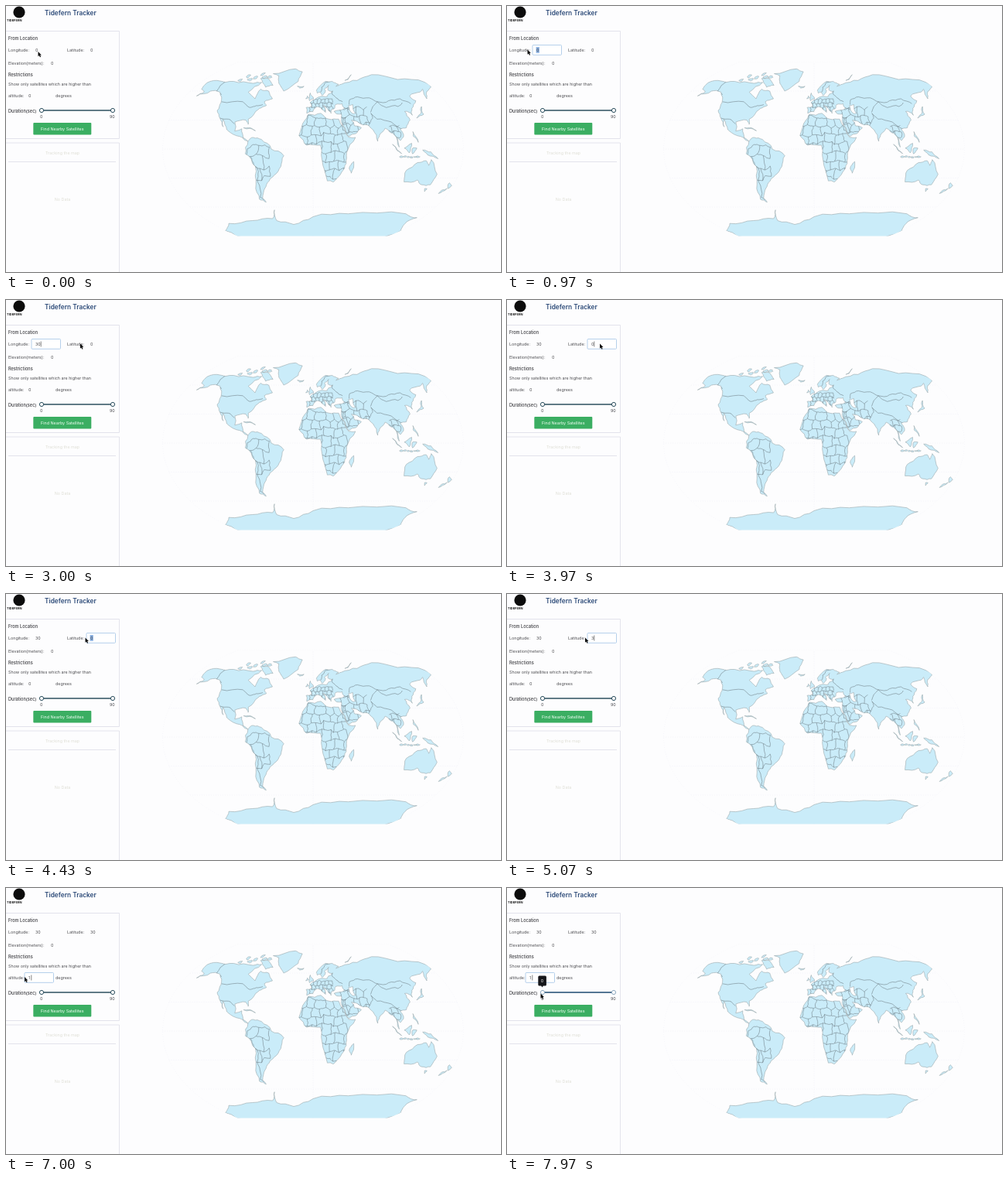
An HTML page for the animation above (8 s loop, 640 px wide and 344 px high).

```html
<!DOCTYPE html>
<html lang="en">
<head>
<meta charset="utf-8">
<title>Satellite tracker</title>
<style>
  html, body { margin: 0; width: 100%; height: 100%; overflow: hidden; background: #fdfdfe; }
  svg { display: block; width: 100vw; height: 100vh; }
  text { font: 5.4px Inter, "Open Sans", sans-serif; fill: #4e4e52; }
  .strong { font-weight: 500; font-size: 5.6px; fill: #38383c; }
  .title { font-weight: 600; font-size: 8.3px; fill: #2c4a78; }
  .pale { fill: #dfdfd6; }
  .rule { fill: none; stroke: #dedee8; stroke-width: .8; }
  .grid { fill: none; stroke: #ededf5; stroke-width: .6; stroke-dasharray: 1 2; }
  .land { fill: #caecf9; stroke: #9aa8ac; stroke-width: .6; stroke-linejoin: round; }
  .border { fill: none; stroke: #6c7c82; stroke-width: .55; stroke-linejoin: round; }
  .field { fill: #fff; stroke: #a3c4e6; stroke-width: .8; }
</style>
</head>
<body>
<svg viewBox="0 0 640 344" preserveAspectRatio="none">
  <defs>
    <clipPath id="globe"><path/></clipPath>
    <clipPath id="mainland"><path/></clipPath>
  </defs>
  <g id="map" clip-path="url(#globe)"></g>

  <circle cx="17" cy="8" r="7.6" fill="#0c0c0c"/>
  <text x="1" y="20" style="font-size:4px;font-weight:700;fill:#222">TIDEFERN</text>
  <text class="title" x="50" y="11.8">Tidefern Tracker</text>

  <path class="rule" d="M0 32.5H146.5V171.5H0M0 177H146.5V344M3 201.5H142"/>
  <text class="strong" x="3" y="43.6">From Location</text>
  <text x="3" y="59">Longitude:</text>
  <text x="79" y="59">Latitude:</text>
  <text x="3" y="76">Elevation(meters):</text>
  <text x="58" y="76">0</text>
  <text class="strong" x="3" y="90.6">Restrictions</text>
  <text x="3" y="103.4">Show only satellites which are higher than</text>
  <text x="3" y="118">altitude:</text>
  <text x="64" y="118">degrees</text>
  <text class="strong" x="3" y="138">Duration(sec)</text>

  <path id="rail" d="M46 135H138" stroke-width="1.6"/>
  <g id="handles" fill="#fff"><circle cx="46" cy="135" r="2.6"/><circle cx="138" cy="135" r="2.6"/></g>
  <text x="44" y="145">0</text>
  <text x="134" y="145">90</text>

  <rect x="35.3" y="151" width="75" height="15.4" rx="1" fill="#3bae62"/>
  <text x="72.8" y="161" text-anchor="middle" style="fill:#f4fff6">Find Nearby Satellites</text>
  <text class="pale" x="73" y="192" text-anchor="middle">Tracking the map</text>
  <text class="pale" x="73" y="252" text-anchor="middle">No Data</text>

  <g id="fields"></g>
  <g id="tooltip">
    <rect x="40.3" y="113.5" width="10.6" height="13" rx="1.5" fill="#16161a"/>
    <path d="M44 126h3l-1.5 2.4z" fill="#16161a"/>
    <text x="45.5" y="122" text-anchor="middle" style="fill:#f5f5f5">0</text>
  </g>
  <path id="cursor" d="M0 0V6.2L1.4 5 2.5 7.2 3.6 6.7 2.6 4.6 4.4 4.4Z" fill="#0a0a0a"/>
</svg>
<script>
const byId = id => document.getElementById(id);
function add(parent, tag, attrs) {
  const el = document.createElementNS('http://www.w3.org/2000/svg', tag);
  for (const name in attrs) el.setAttribute(name, attrs[name]);
  return parent.appendChild(el);
}
let seed = 7;
const random = () => (seed = (seed * 16807) % 2147483647) / 2147483647;
const jitter = amount => (random() * 2 - 1) * amount;

// Kavrayskiy VII projection of a longitude and latitude in degrees
const RAD = Math.PI / 180, SCALE = 71.6;
function project([lon, lat]) {
  const phi = lat * RAD;
  return [397 + SCALE * 1.5 * lon / 180 * Math.sqrt(Math.PI ** 2 / 3 - phi * phi), 185 - SCALE * phi];
}
const parse = text => text.split(',').map(pair => pair.trim().split(' ').map(Number));
const trace = points => 'M' + points.map(p => p.map(v => v.toFixed(1)).join(' ')).join('L');

// Midpoint displacement turns a few key points into a ragged line
function roughen(points, depth = 2) {
  if (!depth) return points;
  const out = [points[0]];
  for (let i = 1; i < points.length; i++) {
    const [x0, y0] = points[i - 1], [x1, y1] = points[i];
    const length = Math.hypot(x1 - x0, y1 - y0) || 1, shift = jitter(Math.min(length, 16) * .13) / length;
    out.push([(x0 + x1) / 2 - (y1 - y0) * shift, (y0 + y1) / 2 + (x1 - x0) * shift], points[i]);
  }
  return roughen(out, depth - 1);
}
const line = points => trace(roughen(points.map(project)));
const coast = points => line([...points, points[0]]) + 'Z';
const map = byId('map');

const range = (from, to, step) => Array.from({ length: Math.floor((to - from) / step) + 1 }, (_, i) => from + i * step);
const meridian = lon => range(-90, 90, 5).map(lat => project([lon, lat]));
byId('globe').firstChild.setAttribute('d', trace([...meridian(-180), ...meridian(180).reverse()]));
add(map, 'path', { class: 'grid', d: [-179.8, 0, 179.8].map(lon => trace(meridian(lon))).join('')
  + range(-60, 90, 30).map(lat => trace([project([-180, lat]), project([180, lat])])).join('') });

const continents = {
  northAmerica: `-168 66, -157 71, -128 70, -95 68, -82 69, -94 59, -80 52, -78 62, -65 60, -56 52, -66 49, -62 45,
    -70 42, -76 35, -81 31, -80 25.5, -84 30, -97 28, -95 18.5, -87 21, -84 11, -78 8, -88 13, -105 20, -113 31,
    -110 23, -117 32, -124 40, -124 48, -135 59, -150 60, -164 55, -158 59, -166 62`,
  southAmerica: `-78 8, -72 12, -62 10, -50 0, -35 -7, -39 -18, -48 -27, -58 -35, -62 -40, -69 -51, -66 -55,
    -74 -52, -73 -37, -70 -18, -81 -5`,
  africa: `-6 36, 10 37, 20 31, 32 31, 43 12, 51 12, 40 -4, 40 -15, 35 -24, 26 -34, 18 -33, 12 -17, 9 4, -8 4,
    -17 14, -10 30`,
  eurasia: `31 70, 20 70, 5 61, 6 58, 11 59, 13 55.5, 18 60, 17 62, 24 66, 22 61, 29 60, 22 57, 20 54.5, 9 54, 2 51,
    -4 48, -1.5 44, -9 43, -8 37, 0 39, 4 43.5, 10 43, 16 38, 13 45.5, 20 40, 23 37, 24 41, 28 42, 30 46, 39 47,
    41 42, 27 39, 30 36.5, 36 36.5, 35 29, 43 13, 52 16, 59 22, 51 24, 48 30, 57 27, 67 25, 73 20, 77.5 8, 80 14,
    88 21.5, 94 17, 98 15, 103 2, 100 13, 105 9, 109 13, 106 20, 114 22, 121 30, 118 39, 126 35, 129 42, 140 50,
    136 55, 155 59, 163 62, 157 52, 163 58, 179 64, 179 69, 140 72, 104 77, 72 71, 44 67, 35 65, 40 67`,
  australia: `114 -22, 126 -14, 136 -12, 140 -17, 142 -11, 153 -26, 150 -37, 139 -37, 131 -32, 115 -34`,
  antarctica: `-180 -94, -180 -84.5, -150 -77, -103 -74, -67 -72, -58 -63, -62 -74, -35 -78, 0 -70, 55 -67, 145 -67,
    170 -71, 165 -78, 180 -84.5, 180 -94`,
  greenland: `-72 78, -35 83, -20 80, -24 70, -43 60, -54 68, -60 76`
};
const mainland = Object.values(continents).map(text => coast(parse(text))).join('');
byId('mainland').firstChild.setAttribute('d', mainland);
add(map, 'path', { class: 'land', d: mainland });

const islands = `-5 50, 1 52, -4 58; -10 52, -6 53, -8 55; -24 65, -14 65, -20 63; -62 66, -72 64, -88 73, -75 73;
  49 -13, 47 -25, 44 -20; 130 32, 141 36, 143 44, 138 37; 95 5, 106 -5, 101 -2; 109 1, 118 6, 115 -4;
  119 -5, 124 1, 119 1; 131 -1, 141 -3, 150 -10, 137 -6; 121 18, 126 7, 121 13; 173 -35, 178 -38, 175 -41;
  174 -41, 167 -46, 170 -42; -85 22, -70 19, -79 22; 52 71, 68 77, 58 72; 145 -41, 148 -41, 147 -44`;
const blob = (lon, lat, size) => coast(range(0, 300, 60).map(a =>
  [lon + 2.4 * size * Math.cos(a * RAD) * (.6 + random()), lat + size * Math.sin(a * RAD) * (.6 + random())]));
const arctic = range(-120, -75, 7.5).map(lon => blob(lon, 75 + (lon + 100) / 12 + jitter(3), 1.3)).join('');
const javaArc = range(106, 126, 4).map(lon => blob(lon, -8 + jitter(.5), .7)).join('');
add(map, 'path', { class: 'land', d: islands.split(';').map(text => coast(parse(text))).join('') + arctic + javaArc });

// Countries: a jittered brick mesh over each region, cut off at the coast
function mesh(west, south, east, north, size) {
  const node = lat => lon => [lon + jitter(size * .2), lat + jitter(size * .27)];
  const rows = range(south, north, size).map(lat => range(west, east, size * .6).map(node(lat)));
  let d = '';
  rows.forEach((row, j) => {
    d += line(row);
    row.forEach((point, i) => { if (j && (i + j) % 2) d += line([rows[j - 1][i], point]); });
  });
  return d;
}
const frontiers = `-124 49, -95 49, -83 43, -75 45, -67 46; -141 70, -141 60, -130 56; -117 32, -106 31, -97 26;
  -70 -18, -67 -23, -70 -34, -72 -50, -68 -53; 11 59, 13 64, 20 69, 28 70; 28 60, 28 56, 32 53, 40 49;
  40 43, 48 41; 48 46, 50 51, 62 54, 78 53, 87 49, 103 50, 120 52, 131 47; 74 37, 80 31, 97 28, 108 21;
  74 38, 87 49, 96 43, 112 44, 120 48; 68 24, 75 32, 74 37`;
add(map, 'path', {
  class: 'border', 'clip-path': 'url(#mainland)',
  d: frontiers.split(';').map(text => line(parse(text))).join('')
    + mesh(-18, -30, 42, 34, 9) + mesh(-4, 39, 28, 55, 4.2) + mesh(36, 18, 74, 44, 8)
    + mesh(92, 12, 108, 26, 6) + mesh(-80, -30, -48, 8, 11)
});
add(map, 'path', { d: coast(parse('47 45, 53 46, 54 37, 50 37')), fill: '#fdfdfe', stroke: '#9aa8ac', 'stroke-width': .6 });

// Form fields: focus span, selection span and the values typed over time
const fields = [
  { x: 33, y: 50.5, focus: [350, 3500], select: [750, 1500], values: [[0, '0'], [1500, '3'], [1750, '30']] },
  { x: 104, y: 50.5, focus: [3500, 6350], select: [4350, 4850], values: [[0, '0'], [4850, '3'], [5250, '30']] },
  { x: 24, y: 109.5, focus: [6350, 8000], select: [6600, 6950], values: [[0, '0'], [6950, '1']] }
];
for (const field of fields) {
  const { x, y } = field, group = byId('fields');
  field.box = add(group, 'rect', { class: 'field', x, y, width: 37.5, height: 12.8, rx: 1 });
  field.mark = add(group, 'rect', { x: x + 4.6, y: y + 2.6, width: 4.2, height: 7.6, fill: '#84acdf' });
  field.text = add(group, 'text', { x: x + 5, y: y + 8.5 });
  field.caret = add(group, 'path', { stroke: '#333', 'stroke-width': .6 });
}

// Cursor moves: start, end, x, y
const moves = [
  [400, 850, 26.5, 56.5], [2500, 3250, 120, 56.5], [4100, 4500, 101, 56.5], [5500, 6050, 44, 122],
  [6100, 6300, 34, 115], [6450, 6650, 24, 115], [7300, 7750, 43.5, 136.5]
];
function cursorAt(t) {
  return moves.reduce(([x, y], [start, end, toX, toY]) => {
    const p = Math.min(1, Math.max(0, (t - start) / (end - start))), ease = p * p * (3 - 2 * p);
    return [x + (toX - x) * ease, y + (toY - y) * ease];
  }, [41.5, 59]);
}

const within = (t, [start, end]) => t >= start && t < end;
const show = (el, on) => el.setAttribute('visibility', on ? 'visible' : 'hidden');

function draw() {
  const t = performance.now() % 8000;
  for (const f of fields) {
    const focused = within(t, f.focus), selected = within(t, f.select);
    const [typedAt, value] = f.values.filter(v => v[0] <= t).pop();
    const blinkOn = (t - Math.max(typedAt, f.focus[0])) % 1000 < 500;
    f.text.textContent = value;
    show(f.box, focused);
    show(f.mark, selected);
    show(f.caret, focused && !selected && blinkOn);
    f.caret.setAttribute('d', `M${f.x + 5.4 + 3.4 * value.length} ${f.y + 3}v7`);
  }
  const hover = t >= 7750;
  show(byId('tooltip'), hover);
  byId('rail').setAttribute('stroke', hover ? '#1d4a70' : '#2c4f5e');
  byId('handles').setAttribute('stroke', hover ? '#8ea9c0' : '#2c4f5e');
  byId('cursor').setAttribute('transform', `translate(${cursorAt(t)})`);
  requestAnimationFrame(draw);
}
draw();
</script>
</body>
</html>
```
